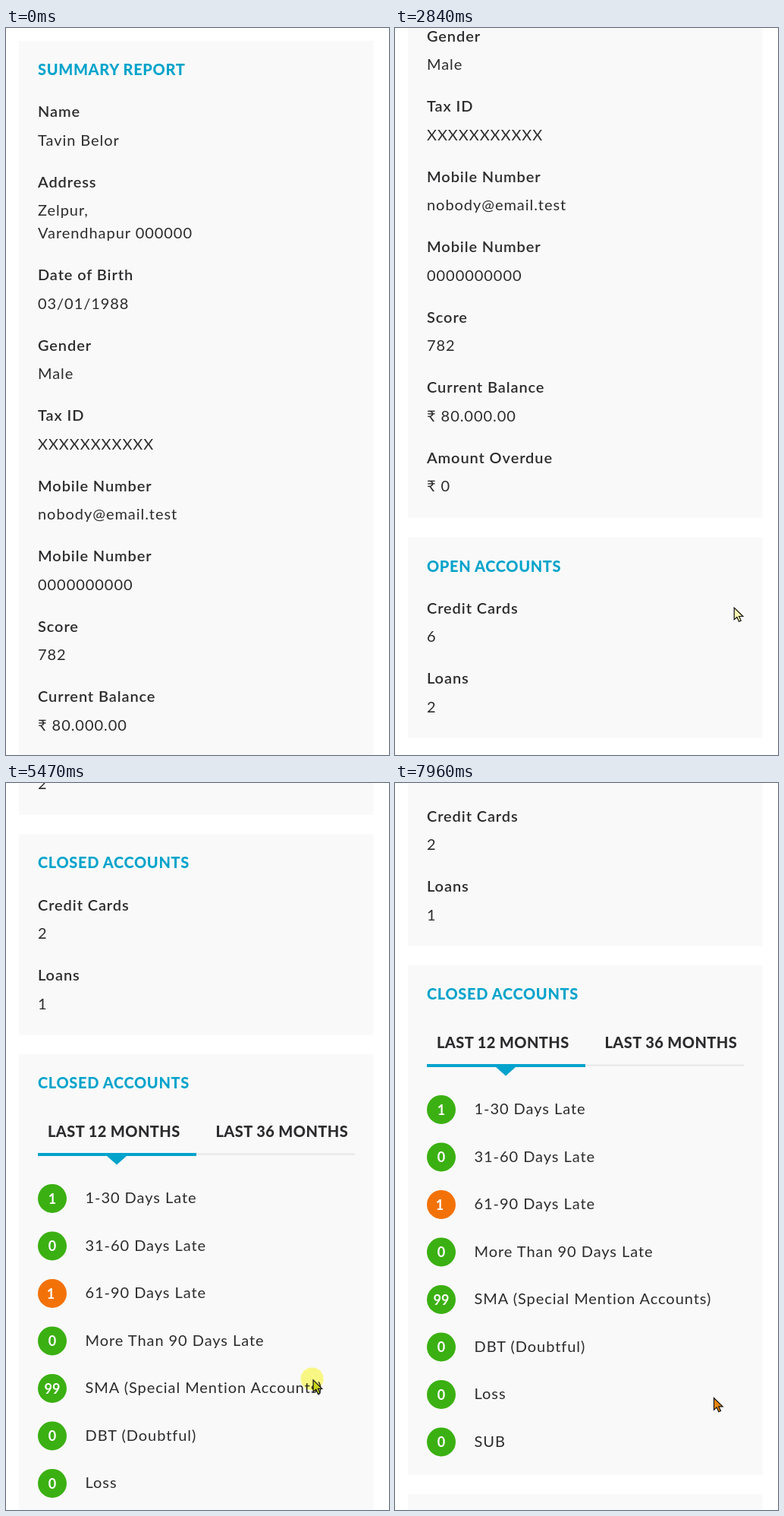
An HTML page that plays this animation: 505 by 957 pixels, repeating every 8000 ms.

```html
<!DOCTYPE html>
<html lang="en">
<head>
<meta charset="utf-8">
<title>Summary report</title>
<style>
  html, body { margin: 0; width: 100%; height: 100%; overflow: hidden; background: #fff; }
  svg { display: block; width: 505px; height: 957px; }
  text { font: 400 20px Lato, "Noto Sans", sans-serif; letter-spacing: 0.95px; fill: #2c2c2e; }
  .label { font-weight: 600; letter-spacing: 0.9px; }
  .title, .tab { font-weight: 800; letter-spacing: 0.4px; }
  .title { fill: #00a3cb; letter-spacing: 0.65px; }
  .badge { font-weight: 700; font-size: 18px; letter-spacing: 0; fill: #fff; text-anchor: middle; }
  #press { mix-blend-mode: multiply; }
</style>
</head>
<body>
<svg viewBox="0 0 505 957">
  <g id="page"></g>
  <circle id="press" r="15" fill="#fffd86"/>
  <path id="cursor" d="M.5 .5V16.1L4.2 12.9L6.8 18.7L9.5 17.5L6.9 11.9H12.1Z" stroke="#111" stroke-width="1.2"/>
</svg>
<script>
const LOOP = 8000;
const GREEN = '#3bb012', ORANGE = '#f37208', BLUE = '#00a3cb';
const byId = id => document.getElementById(id);
const page = byId('page'), press = byId('press'), cursor = byId('cursor');

function add(tag, attrs, content) {
  const el = document.createElementNS('http://www.w3.org/2000/svg', tag);
  for (const k in attrs) el.setAttribute(k, attrs[k]);
  if (content !== undefined) el.textContent = content;
  page.append(el);
}

// y is the middle of the capitals
const write = (content, x, y, cls = 'value') => add('text', { x, y: y + 7, class: cls }, content);

// Panels stack downwards; each returns the top of the next one
function panel(top, height, title, rows = []) {
  add('rect', { x: 17, y: top, width: 467.5, height, fill: '#f9f9f9' });
  write(title, 42, top + 38, 'title');
  let y = top + 93.25;
  for (const [label, ...values] of rows) {
    write(label, 42, y, 'label');
    values.forEach((v, i) => write(v, 42, y + 37.5 + 30 * i));
    y += 62.5 + 30 * values.length;
  }
  return top + height + 25.5;
}

function lateness(top) {
  const tabs = top + 101.5, line = top + 130;
  write('LAST 12 MONTHS', 55, tabs, 'tab');
  write('LAST 36 MONTHS', 276.5, tabs, 'tab');
  add('rect', { x: 251, y: line + 0.5, width: 209, height: 2, fill: '#e6e6e6' });
  add('path', { d: `M42 ${line}h209v4h-92l-13 11.5l-13 -11.5h-91z`, fill: BLUE });
  [
    ['1', '1-30 Days Late'],
    ['0', '31-60 Days Late'],
    ['1', '61-90 Days Late', ORANGE],
    ['0', 'More Than 90 Days Late'],
    ['99', 'SMA (Special Mention Accounts)'],
    ['0', 'DBT (Doubtful)'],
    ['0', 'Loss'],
    ['0', 'SUB']
  ].forEach(([count, label, color = GREEN], i) => {
    const y = line + 59.8 + 62.5 * i;
    add('circle', { cx: 61, cy: y, r: 19, fill: color });
    write(count, color === ORANGE ? 59 : 61, y, 'badge');
    write(label, 104.5, y - 0.5);
  });
}

let top_ = panel(17, 1035, 'SUMMARY REPORT', [
  ['Name', 'Tavin Belor'],
  ['Address', 'Zelpur,', 'Varendhapur 000000'],
  ['Date of Birth', '03/01/1988'],
  ['Gender', 'Male'],
  ['Tax ID', 'XXXXXXXXXXX'],
  ['Mobile Number', 'nobody@email.test'],
  ['Mobile Number', '0000000000'],
  ['Score', '782'],
  ['Current Balance', '₹ 80.000.00'],
  ['Amount Overdue', '₹ 0']
]);
top_ = panel(top_, 264.3, 'OPEN ACCOUNTS', [['Credit Cards', '6'], ['Loans', '2']]);
top_ = panel(top_, 264.3, 'CLOSED ACCOUNTS', [['Credit Cards', '2'], ['Loans', '1']]);
const late = top_;
top_ = panel(late, 670.7, 'CLOSED ACCOUNTS');
lateness(late);
top_ = panel(top_, 172, 'ACCOUNTS UNDER DISPUTE', [['Accounts', '2']]);
panel(top_, 264.3, 'ENQUIRIES', [['Last 3 Years', '2'], ['Total', '6']]);

// Drags move the page with the pointer, then it glides to a stop
const MAX_SCROLL = 1915, GLIDE = 850, POWER = 1.2;
const drags = [
  { start: 1750, time: 650, from: [466, 814], to: [430, 560], fill: '#f8f8b0' },
  { start: 3000, time: 440, from: [448, 778], to: [441, 561], fill: '#b9b994' },
  { start: 4016, time: 234, from: [430, 607], to: [392, 492], fill: '#a5d816' },
  { start: 5430, time: 320, from: [405, 798], to: [400, 650], fill: '#cbd518' },
  { start: 6300, time: 260, from: [402, 649], to: [398, 512], fill: '#ee7412' },
  { start: 7600, time: 300, from: [401, 406], to: [420, 809], fill: '#e8860f' }
];
const entry = { at: [506, 850], end: 950 };

const clamp = u => Math.min(1, Math.max(0, u));
const smooth = u => u * u * (3 - 2 * u);
const mix = (a, b, u) => a.map((v, i) => v + (b[i] - v) * u);

function pose(t) {
  let { at, end } = entry, scroll = 0, fill = drags[0].fill, pressed = false;
  for (const d of drags) {
    // rest, then travel to the next drag's starting point
    const gap = d.start - end;
    at = mix(at, d.from, smooth(clamp((t - end - 0.4 * gap) / (0.4 * gap))));
    if (t < d.start) break;

    end = d.start + d.time;
    const pull = clamp((t - d.start) / d.time) ** POWER;
    const dist = d.from[1] - d.to[1];
    const glide = POWER * dist / d.time * GLIDE / 2;
    const coast = 1 - (1 - clamp((t - end) / GLIDE)) ** 2;
    scroll = Math.min(MAX_SCROLL, scroll + dist * pull + glide * coast);
    at = mix(d.from, d.to, pull);
    fill = d.fill;
    pressed = t < end;
    if (pressed) break;
  }
  return { at, scroll, fill, pressed };
}

function draw(t) {
  const { at: [x, y], scroll, fill, pressed } = pose(t);
  page.setAttribute('transform', `translate(0 ${-Math.round(scroll)})`);
  cursor.setAttribute('transform', `translate(${x} ${y})`);
  cursor.setAttribute('fill', fill);
  press.setAttribute('cx', x - 1);
  press.setAttribute('cy', y - 1);
  press.setAttribute('visibility', pressed ? 'visible' : 'hidden');
}

const start = performance.now();
function tick() {
  draw((performance.now() - start) % LOOP);
  requestAnimationFrame(tick);
}
tick();
</script>
</body>
</html>
```
